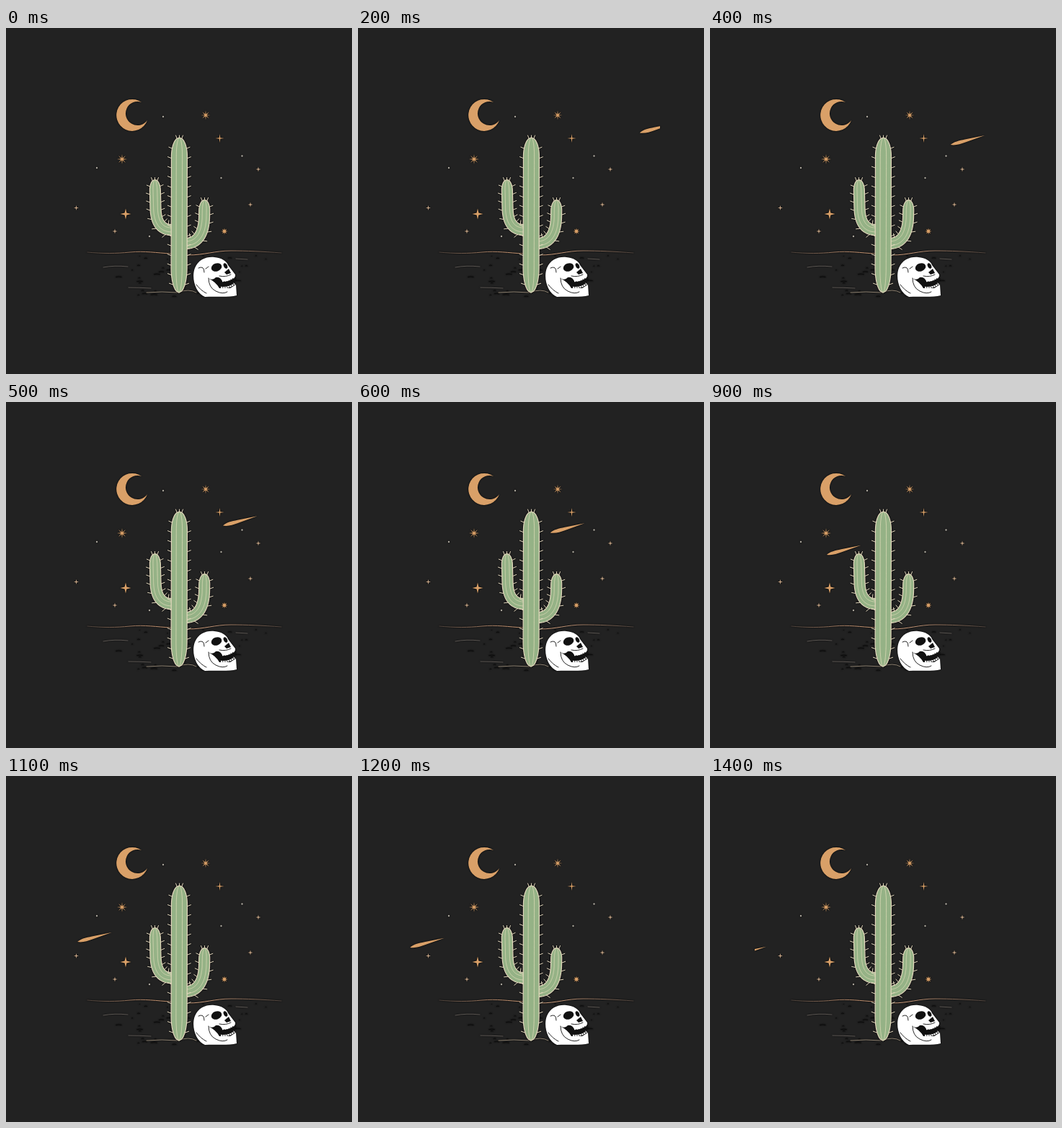
An HTML page that plays this animation: 480 by 480 pixels, repeating every 1.5 s.

```html
<!DOCTYPE html>
<html lang="en">
<head>
<meta charset="utf-8">
<title>Desert night</title>
<style>
html, body { margin: 0; width: 100%; height: 100%; overflow: hidden; background: #222; }
svg { display: block; width: 100vw; height: 100vh; }
.halo { filter: drop-shadow(0 0 1px #000); }
</style>
</head>
<body>
<svg viewBox="0 0 480 480" fill="none" stroke-linecap="round" stroke-linejoin="round">
  <defs>
    <clipPath id="sky"><rect x="62" y="90" width="357" height="200"/></clipPath>
    <linearGradient id="fade" gradientUnits="userSpaceOnUse" x1="112" y1="0" x2="384" y2="0">
      <stop offset="0" stop-color="#4a403a"/>
      <stop offset=".35" stop-color="#c0906f"/>
      <stop offset=".6" stop-color="#c99a7a"/>
      <stop offset="1" stop-color="#4a403a"/>
    </linearGradient>
  </defs>
  <rect width="480" height="480" fill="#222"/>

  <g class="halo" fill="#d9a068">
    <path d="M188 103A22 22 0 1 0 196 128A16.500 16.500 0 1 1 188 103Z"/>
    <g id="stars"></g>
    <g clip-path="url(#sky)"><path id="meteor" d="M0 0C4-4.300 12-6 20-7.700L47.500-13.200L20-3.300C14-1 7 1.200 0 0Z"/></g>
  </g>

  <g class="halo">
    <path id="sand" stroke="#0c0c0c"/>
    <path stroke="url(#fade)" d="M113 311C135 313 152 313 172 311S209 312 229 313M253 315C275 315 290 309 312 309S355 310 382 312"/>
    <path stroke="#77706a" stroke-width=".7" d="M135 332Q150 329 169 331M170 360Q184 360 201 361M319 320L335 321"/>
    <path stroke="#a99a85" stroke-width=".8" d="M195 367Q216 365 238 367Q254 361 264 367"/>
  </g>

  <g id="cactus" class="halo"></g>

  <g class="halo">
    <path fill="#fff" d="M276 373C262 367 257 346 262 333C267 321 278 317 289 318C299 319 306 323 308 329L318 342L318 348L314 352L319 356L320 371C309 374 290 372 276 373Z"/>
    <g fill="#111">
      <ellipse cx="292" cy="332" rx="7.500" ry="5.500" transform="rotate(-20 292 332)"/>
      <ellipse cx="304.500" cy="330" rx="2.500" ry="4" transform="rotate(-25 304.500 330)"/>
      <path d="M303 339L309 334L312 340L306 342Z"/>
      <path d="M280 347Q287 351 291 346Q297 345 300 351L307 351L318 345L319 350L315 353L319 356L311 361L296 361Q291 352 280 347Z"/>
    </g>
    <path stroke="#111" stroke-width=".9" d="M267 333Q275 329 275 339M277 334L281 331M281 347Q281 360 291 365T307 366M264 356Q270 364 278 368M296 344Q305 346 312 342"/>
    <path stroke="#fff" stroke-width="2.400" stroke-linecap="butt" stroke-dasharray="2.300 .8" d="M300 351Q309 351 317 345M298 360Q309 361 317 355"/>
  </g>
</svg>
<script>
const NS = 'http://www.w3.org/2000/svg';
const $ = id => document.getElementById(id);

function add(parent, tag, attrs) {
  const el = document.createElementNS(NS, tag);
  for (const k in attrs) el.setAttribute(k, attrs[k]);
  return parent.appendChild(el);
}

const poly = pts => 'M' + pts.map(p => p.map(v => v.toFixed(2)).join(' ')).join('L');

// Star whose radius alternates between r and r * inner.
function star(x, y, r, rays = 4, inner = .25, fill = '#d9a068') {
  const pts = Array.from({ length: rays * 2 }, (_, i) => {
    const a = i * Math.PI / rays, d = i % 2 ? r * inner : r;
    return [x + d * Math.sin(a), y - d * Math.cos(a)];
  });
  add($('stars'), 'path', { d: poly(pts), fill });
}

star(277, 121, 6.5, 8);
star(161, 182, 7, 8);
star(303, 282, 4.5, 8, .4);
star(166, 258, 7.5, 4, .27);
star(296.5, 153, 6, 4, .18);
for (const [x, y] of [[350, 196], [339, 245], [97.5, 249.5], [151, 282]])
  star(x, y, 3.5, 4, .3, '#c3a384');
for (const [x, y] of [[218, 123], [327.5, 177.5], [298.5, 208], [126, 194], [199, 289]])
  add($('stars'), 'circle', { cx: x, cy: y, r: 1.2, fill: '#aaa59b' });

let seed = 7;
function rnd() {
  seed = seed * 16807 % 2147483647;
  return seed / 2147483647;
}

// Short strokes; the patch of sand narrows towards the viewer.
let sand = '';
for (let i = 0; i < 45; i++) {
  const depth = rnd(), y = 316 + 60 * depth;
  const x = 245 + (rnd() * 2 - 1) * (120 - 55 * depth);
  const w = 1 + 8 * rnd() ** 2;
  sand += `M${x.toFixed(1)} ${y.toFixed(1)}q${(w / 2).toFixed(1)}-1 ${w.toFixed(1)} 0`;
}
$('sand').setAttribute('d', sand);

// Rounded taper over length t at an end; 0 keeps that end square.
const taper = (s, t) => s < t ? Math.sqrt(1 - (1 - s / t) ** 2) : 1;

// A limb grows along its axis; edges, ribs and spines all follow its half width.
function limb(axis, half, foot, tip, gap) {
  const g = add($('cactus'), 'g', { stroke: '#e3d7bd' });
  const path = add(g, 'path', { d: axis, stroke: 'none' });
  const len = path.getTotalLength();

  function at(s, side, out = 0) {
    const p = path.getPointAtLength(s);
    const a = path.getPointAtLength(Math.max(0, s - .5));
    const b = path.getPointAtLength(Math.min(len, s + .5));
    const n = Math.hypot(b.x - a.x, b.y - a.y);
    const d = side * half * taper(s, foot) * taper(len - s, tip) + Math.sign(side) * out;
    return [p.x - (b.y - a.y) / n * d, p.y + (b.x - a.x) / n * d];
  }
  const edge = side => Array.from({ length: 121 }, (_, i) => at(len * i / 120, side));

  let spines = '';
  for (let s = gap * .8; s < len - 4; s += gap)
    for (const side of [-1, 1])
      spines += poly([at(s, side), at(Math.min(len, s + 2), side, 5)]);
  for (const dx of [-5, 0, 5]) {
    const [x, y] = at(len, 0);
    spines += poly([[x + dx * .6, y + 2], [x + dx, y - 3]]);
  }
  add(g, 'path', { d: spines });
  add(g, 'path', { d: poly([...edge(-1), ...edge(1).reverse()]), fill: '#95b286', 'stroke-width': 1.2 });
  for (const f of [-.38, .38])
    add(g, 'path', { d: poly(edge(f)), stroke: '#d5d6b2', 'stroke-width': .9 });
}

limb('M232 280C214 281 208 268 207.500 250L206.500 210.500', 7.5, 0, 15, 11);
limb('M250 299C267 298 274 284 275 264L275.500 238.500', 7.5, 0, 15, 11);
limb('M240 367L240.500 152', 11, 34, 26, 13.5);

const LOOP = 1500, STEP = 100;

function draw(ms) {
  const n = Math.floor(ms % LOOP / STEP);
  const x = 231.5 - 226.5 * Math.sin(.156 * (n - 7));
  const y = 162 - (x - 334) * .29;
  $('meteor').setAttribute('transform', `translate(${x.toFixed(2)} ${y.toFixed(2)})`);
}

const t0 = performance.now();
function tick() {
  draw(performance.now() - t0);
  requestAnimationFrame(tick);
}
tick();
</script>
</body>
</html>
```
